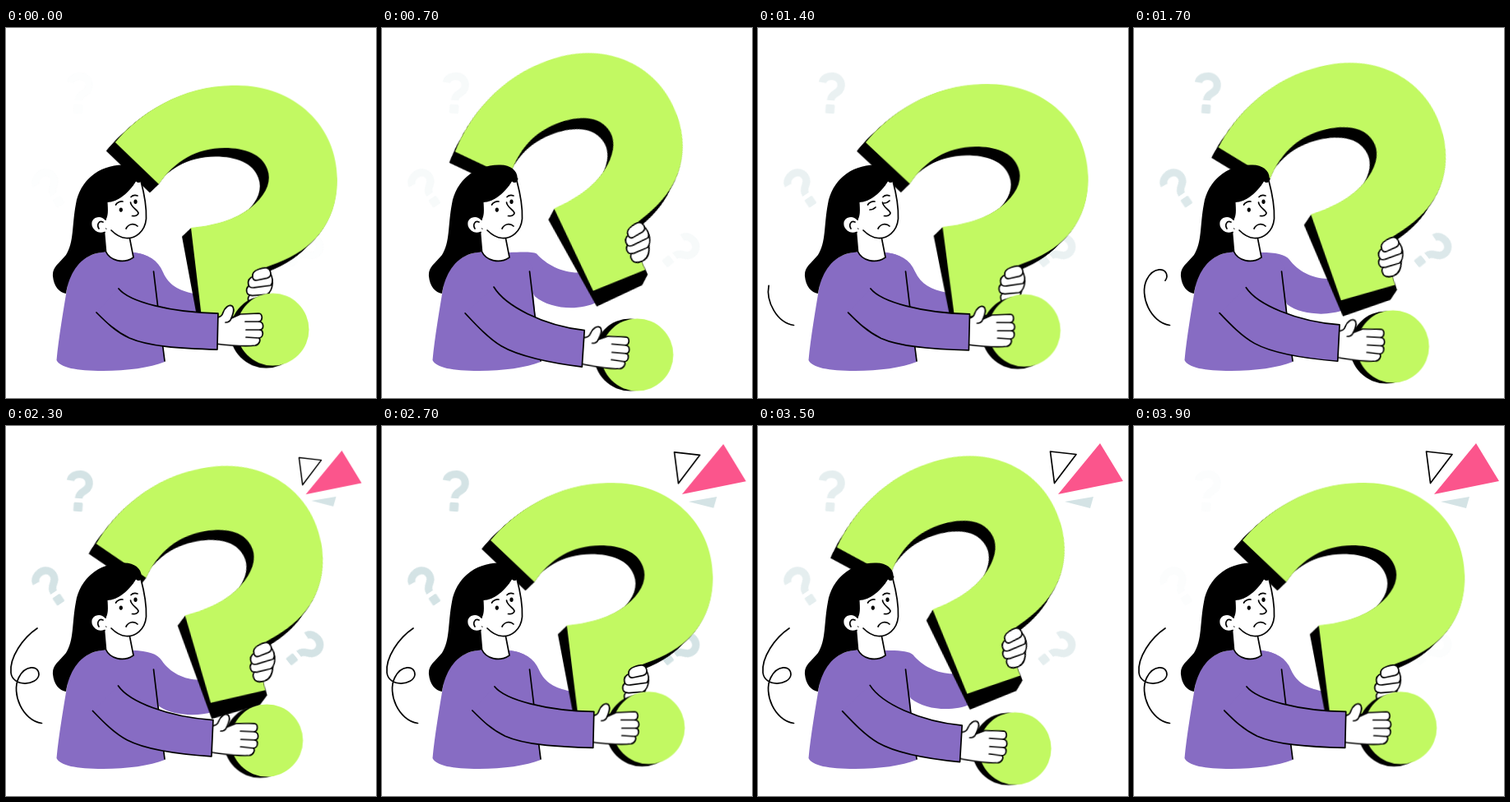
Animation of 450 by 450 pixels, one loop 4 s. Source, as an HTML page:

```html
<!DOCTYPE html>
<html lang="en">
<head>
<meta charset="utf-8">
<title>Big question</title>
<style>
  html, body { margin: 0; width: 100%; height: 100%; overflow: hidden; background: #fff; }
  svg { display: block; width: 100vw; height: 100vh; }
  :root { --green: #c2f962; --purple: #876cc3; --pale: #d4e3e5; }

  .line { fill: none; stroke: #000; stroke-width: 1.7; stroke-linecap: round; stroke-linejoin: round; }
  .skin { fill: #fff; }
  .cloth { fill: var(--purple); }
  .lime { fill: var(--green); }
  .grey { fill: var(--pale); }

  /* Rocking pose: half a swing per iteration, six per loop */
  .swing { animation: 666.6667ms ease-in-out -30ms infinite alternate; }
  .big { transform-origin: 156px 273px; animation-name: tilt; }
  .dot { animation-name: drop; }
  .shade { animation-name: shade; }
  .hand { transform-origin: 258px 369px; animation-name: reach; }
  .far { animation-name: far; }
  .sleeve { animation-name: sleeve; }
  @keyframes tilt { to { transform: translate(-2.5px, -3px) rotate(-19deg); } }
  @keyframes drop { to { transform: translate(-14.5px, 31.5px); } }
  @keyframes shade {
    from { transform: translate(-8px, 3px); }
    to { transform: translate(-8.5px, 0); }
  }
  @keyframes reach { to { transform: translate(-12.5px, 25px) rotate(5deg); } }
  @keyframes far {
    from { d: path("M155 273C172 275 185 282 191 297C198 313 210 319 228 323L240 363C228 363 200 364 186 356L170 297Z"); }
    to { d: path("M155 273C172 272 184 272 188 274C203 291 232 303 256 294L262 333C240 344 205 342 186 326L170 297Z"); }
  }
  @keyframes sleeve {
    from { d: path("M137 317C150 333 200 346 258 347L257 391C210 390 173 387 150 377C133 369 122 358 110 346"); }
    to { d: path("M136 315C150 338 195 362 246 368L243 412.5C205 408 165 399 145 387C130 378 115 362 101 347"); }
  }

  /* One-per-loop accents */
  .loop { animation: 4s linear infinite; }
  .marks { animation-name: fade; }
  .curl { stroke-dasharray: 100 200; animation-name: draw; }
  .burst { transform-origin: 362px 84px; animation-name: pop; animation-timing-function: ease-in-out; }
  .open { animation-name: blink; animation-timing-function: step-end; }
  .shut { animation-name: squint; animation-timing-function: step-end; }
  @keyframes fade {
    0% { opacity: .06; }
    5%, 11% { opacity: 0; }
    17.5% { opacity: .2; }
    35% { opacity: .5; }
    42.5% { opacity: .8; }
    50%, 80% { opacity: 1; }
    97.5% { opacity: .08; }
    100% { opacity: .06; }
  }
  @keyframes draw {
    0%, 22.5% { stroke-dashoffset: 100.5; visibility: hidden; }
    22.6% { visibility: visible; }
    30% { stroke-dashoffset: 83; }
    35% { stroke-dashoffset: 71; }
    42.5% { stroke-dashoffset: 49; }
    56%, 100% { stroke-dashoffset: 0; visibility: visible; }
  }
  @keyframes pop {
    0%, 46.25% { transform: scale(0); }
    52% { transform: scale(1.24); }
    57.5% { transform: scale(.86); }
    63% { transform: scale(1.06); }
    68.5% { transform: scale(.98); }
    74%, 100% { transform: scale(1); }
  }
  @keyframes blink { 0%, 37% { opacity: 1; } 33% { opacity: 0; } }
  @keyframes squint { 0%, 37% { opacity: 0; } 33% { opacity: 1; } }
</style>
</head>
<body>
<svg viewBox="0 0 450 450" xmlns="http://www.w3.org/2000/svg">
  <defs>
    <g id="mark">
      <path d="M-11.500 -12C-10 -23 11.500 -24 11.500 -9.500C11.500 1 0 -1 0 9" fill="none" stroke="#d4e3e5" stroke-width="9.200"/>
      <rect class="grey" x="-5.500" y="14" width="11" height="11" rx="1.500"/>
    </g>
    <path id="side" d="M133 139C163 103 216 69 280 70C352 70 403 120 403 185C403 238 372 270 330 286C320 290 310 293 302 296L308 355L247 362L225 243C258 240 285 231 303 214C318 200 323 185 318 172C312 154 291 146 266 146C232 146 205 162 186 190Z"/>
  </defs>

  <g class="marks loop">
    <use href="#mark" transform="translate(89 79) rotate(4)"/>
    <use href="#mark" transform="translate(53 195) rotate(-34)"/>
    <use href="#mark" transform="translate(363 271.500) rotate(51)"/>
  </g>

  <path class="line curl loop" pathLength="100" d="M43.500 361.500C20 358 6 325 15.500 306C23 291 40 290 40 302.500C38 316 8 318 6 300C4 282 20 258 38 246"/>

  <g class="burst loop">
    <path d="M416 21L444 67L365 83Z" fill="#fb558c"/>
    <path class="line" d="M355.500 31L387 34.500L360.500 69.500Z"/>
    <path class="grey" d="M373 92L408 86L404 100Z"/>
  </g>

  <path class="far swing cloth" d="M155 273"/>

  <g class="big swing">
    <g id="depth"></g>
    <path class="lime" d="M133 139C163 103 216 69 280 70C352 70 403 120 403 185C403 238 372 270 330 286C320 290 310 293 302 296L306 349L238 353L225 243C258 240 285 231 303 214C318 200 323 185 318 172C312 154 291 146 266 146C232 146 205 162 186 190Z"/>
    <g transform="rotate(19 156 273)">
      <path class="skin" d="M302 249L314 239C320 239 324 244 327 252C329 262 328 276 322 284C316 289 308 288 306 282L300 270Z"/>
      <g class="line" style="fill:#fff">
        <path d="M306 283C303 278 307 274 311 273L327 266C328 275 326 282 320 285C314 288 308 288 306 283Z"/>
        <path d="M301 274C298 269 301 265 305 263L327 253C329 260 328 266 325 269L309 276C305 277 303 277 301 274Z"/>
        <path d="M300 265C297 260 299 256 303 253L320 243C325 246 328 253 326 257L308 266C304 268 302 268 300 265Z"/>
        <path d="M302 255C299 250 302 246 306 243C312 238 317 237 320 241C323 245 322 248 319 250L309 256C306 258 304 258 302 255Z"/>
      </g>
    </g>
  </g>

  <g class="dot swing">
    <circle class="shade swing" cx="324.500" cy="366.500" r="44"/>
    <circle class="lime" cx="324.500" cy="366.500" r="44"/>
  </g>

  <!-- Body and head -->
  <path class="cloth" d="M122 272C98 274 81 286 75 312C70 342 64 377 61.500 404C66 413 85 417 118 417C148 417 175 413 193 406L186 345L182 290C178 279 170 274 153 273Z"/>
  <path class="line" d="M179.500 296L186 350L193 405"/>
  <path d="M164.500 184C166 174 156 165.500 142 166.500C112 167 90 186 85 214C80 240 83 260 73 276C64 287 56 291 57 302C58 314 65 322 73 323C76 304 85 284 104 276C111 273 117 273 123 272L128 225L158 196Z"/>
  <path class="skin" d="M119 244L121.500 272C126 282 142 288 155 280L151 250Z"/>
  <path class="line" d="M119.500 249L121.500 272C126 282 142 288 155 279L150.500 256"/>
  <path class="skin" d="M123 212C136 212 150 200 158 186L164 186C168 201 171 219 170.500 232C169 248 157 256.500 146 255.500C134 254 124 248 119 240Z"/>
  <path class="line" d="M164 186C168 201 171 219 170.500 232C169 248 157 256.500 146 255.500C139 255 133 251 128 246"/>
  <path d="M165.500 183C165 187 162 190 158 186.500C152 197 142 205 123.500 211.500C124 221 125 230 120 235L108 226L122 185L150 172Z"/>
  <path class="skin" d="M121 232C116 227 105 228 103.500 237C103 245 111 252 121 248Z"/>
  <path class="line" d="M121 233C116 227 105 228 103.500 237C103 245 111 252 120 248.500M118 236C113 234 110 239 113 244"/>

  <path class="line" d="M133.500 215C135 212 139 210.500 142 211M152 205.500C154 203.500 157 203 160 204M151.500 212C152 218 160 221 161 225C161 228 157 229 153.500 228.500M146 244C149 238 156 237 160 241"/>
  <g class="open loop">
    <ellipse cx="139.800" cy="221.200" rx="2.100" ry="2.700"/>
    <ellipse cx="157.500" cy="211.300" rx="2.100" ry="2.700"/>
  </g>
  <path class="line shut loop" d="M136 221C139 221 141 220 143 218M153 213C156 213 158 212 160 210"/>

  <!-- Near arm -->
  <g class="hand swing">
    <path class="line" style="fill:#fff" d="M255 352C261 352 263 350 264 346C266 340 271 336 275 338C279 341 276 348 274 353L285 348L307 347C312 347 313 355 308 357C314 358 314 366 309 367C314 368 313 376 308 377C310 380 308 385 303 386C290 388 272 386 255 384Z"/>
    <path class="line" d="M308 357L291 357M309 367L292 367M308 377L292 376M274 353C273 356 270 358 267 358"/>
  </g>
  <path class="sleeve swing line" style="fill:var(--purple)" d="M137 317"/>
</svg>
<script>
  // Sweep the silhouette down-left to give the big sign its thickness
  const depth = document.getElementById('depth');
  const steps = 16;
  for (let i = 1; i <= steps; i++) {
    const copy = document.createElementNS('http://www.w3.org/2000/svg', 'use');
    copy.setAttribute('href', '#side');
    copy.setAttribute('x', -11 * i / steps);
    copy.setAttribute('y', 10.5 * i / steps);
    depth.append(copy);
  }
</script>
</body>
</html>
```
